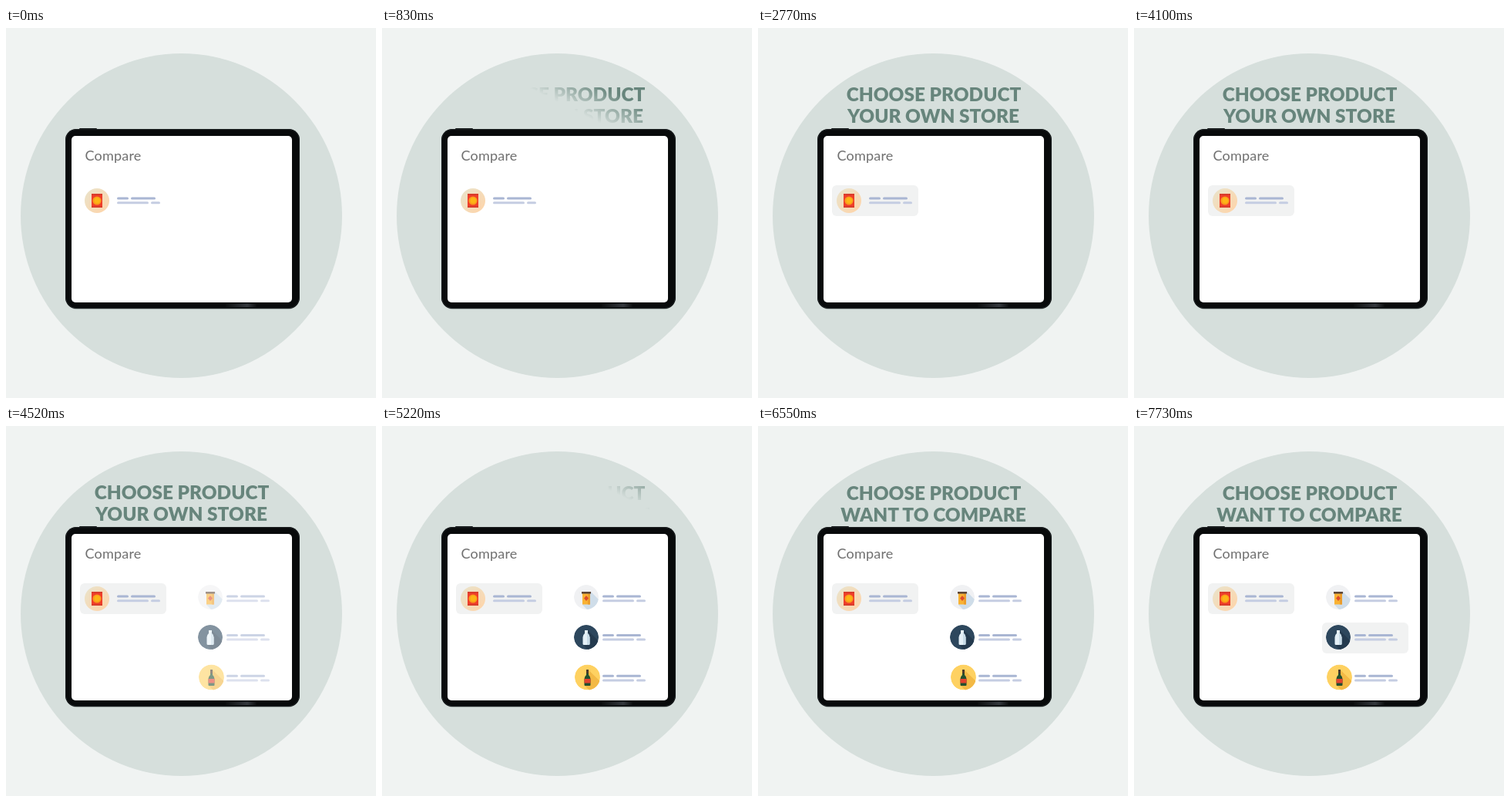
Write an HTML page that moves like this. It is 480 px wide and 480 px high and loops after 8 s.

```html
<!DOCTYPE html>
<html lang="en">
<head>
<meta charset="utf-8">
<title>Compare</title>
<style>
  html, body { margin: 0; height: 100%; overflow: hidden; background: #f0f3f2; }
  svg { display: block; width: 100%; height: 100%; }
  .headline { font: 900 24.4px Lato, sans-serif; text-anchor: middle; fill: url(#wipe); }
  .title { font: 18px Lato, sans-serif; letter-spacing: .2px; fill: #707070; }
  .card { fill: #f1f2f2; }
</style>
</head>
<body>
<svg viewBox="0 0 480 480">
  <defs>
    <!-- Soft diagonal edge, moved by gradientTransform -->
    <linearGradient id="wipe" gradientUnits="userSpaceOnUse" x1="0" y1="77" x2="20" y2="37">
      <stop offset="0" stop-color="#67857c" stop-opacity="0"/>
      <stop offset="1" stop-color="#67857c"/>
    </linearGradient>
    <linearGradient id="peach" x2="1" y2="1">
      <stop offset=".1" stop-color="#ebe2c8"/>
      <stop offset=".9" stop-color="#fdd5ab"/>
    </linearGradient>
    <linearGradient id="gloss">
      <stop offset="0" stop-color="#0b0d0e"/>
      <stop offset=".7" stop-color="#34383d"/>
      <stop offset="1" stop-color="#0b0d0e"/>
    </linearGradient>
    <clipPath id="disc"><circle r="16"/></clipPath>
    <g id="lines" stroke-width="3" stroke-linecap="round">
      <path d="M1.5 0h12M19.5 0h29" stroke="#a9b6d3"/>
      <path d="M1.5 5.7h38M45.5 5.7h9" stroke="#c5cde2"/>
    </g>
  </defs>

  <ellipse cx="227.5" cy="243.5" rx="208.5" ry="210.5" fill="#d6dfdc"/>

  <text class="headline"><tspan x="228" y="95">CHOOSE PRODUCT</tspan><tspan id="second" x="227.5" y="123"></tspan></text>

  <rect x="78" y="133" width="302" height="232" rx="14" fill="#9ba4a2"/>
  <rect x="95" y="130" width="23" height="3" rx="1" fill="#15191a"/>
  <rect x="77" y="131" width="304" height="233" rx="14" fill="#080a0b"/>
  <rect x="77.7" y="131.7" width="302.6" height="231.6" rx="13.3" fill="none" stroke="#1d2224"/>
  <rect x="285" y="357.5" width="40" height="4.5" fill="url(#gloss)"/>
  <rect x="85" y="140" width="286" height="216" rx="5" fill="#fff"/>
  <text class="title" x="102.5" y="172">Compare</text>

  <rect id="card1" class="card" x="96" y="204" width="112" height="40" rx="6"/>
  <rect id="card2" class="card" x="244" y="255" width="112" height="40" rx="6"/>

  <g transform="translate(118 224)">
    <circle r="16" fill="url(#peach)"/>
    <path d="M-7-9H7V9H-7z" fill="#ef3e2a"/>
    <path d="M-7-9H7v2H-7zM-7 7H7v2H-7z" fill="#d93b2b"/>
    <circle r="5.6" fill="#f99a1c"/>
    <circle cx=".3" cy="-.3" r="3.8" fill="#fdb515"/>
  </g>
  <use href="#lines" x="144" y="221"/>

  <g id="products">
    <g transform="translate(265 222)">
      <g clip-path="url(#disc)">
        <circle r="16" fill="#f0f1f3"/>
        <path d="M6-7L22 9V24H9L-5 10z" fill="#cfdde9"/>
      </g>
      <path d="M-5-5H5V9.5H-5z" fill="#f9b233"/>
      <path d="M2-5H5V9.5H2z" fill="#eb9d2c"/>
      <path d="M-6-7H6v2.6H-6z" fill="#5d4637"/>
      <path d="M0-2L3 1.5 0 5-3 1.5z" fill="#dd4a2b"/>
    </g>
    <use href="#lines" x="286" y="221"/>

    <g transform="translate(265 274)">
      <g clip-path="url(#disc)">
        <circle r="16" fill="#2d475d"/>
        <path d="M2-9L22 11V24H10L-4 10z" fill="#243a4e"/>
      </g>
      <path d="M-2-9H2V-5Q4.500-3 4.500 0V8.500Q4.500 10 3 10H-3Q-4.500 10-4.500 8.500V0Q-4.500-3-2-5z" fill="#e4f0f7"/>
      <path d="M1-6Q4.500-3 4.500 0V8.500Q4.500 10 3 10H1z" fill="#c8dce8"/>
    </g>
    <use href="#lines" x="286" y="271.400"/>

    <g transform="translate(266.500 326)">
      <g transform="scale(1.030)" clip-path="url(#disc)">
        <circle r="16" fill="#fed161"/>
        <path d="M1.500-9L22 11V26H12L-3 11z" fill="#f3b945"/>
      </g>
      <path d="M-1.500-10H1.500V-3Q4-1 4 2V10Q4 11 3 11H-3Q-4 11-4 10V2Q-4-1-1.500-3z" fill="#23502f"/>
      <path d="M-1.500-10H1.500V-5H-1.500z" fill="#4b3b2b"/>
      <path d="M-4 2H4V7.500H-4z" fill="#e2432e"/>
    </g>
    <use href="#lines" x="286" y="324.300"/>
  </g>
</svg>
<script>
  const LOOP = 8000, SWAP = 5010;
  const [wipe, second, products, card1, card2, headline] =
    ['#wipe', '#second', '#products', '#card1', '#card2', '.headline'].map(s => document.querySelector(s));

  const show = (el, on) => el.setAttribute('opacity', on ? 1 : 0);

  function draw(now) {
    const t = now % LOOP;
    const swapped = t >= SWAP;

    second.textContent = swapped ? 'WANT TO COMPARE' : 'YOUR OWN STORE';
    headline.setAttribute('transform', `translate(0 ${swapped ? 1 : 0})`);

    const edge = 341 - 0.271 * (t - (swapped ? SWAP : 270));
    wipe.setAttribute('gradientTransform', `translate(${edge / 5} ${-edge * 2 / 5})`);

    const fade = Math.min(1, Math.max(0, (t - 4250) / 760));
    products.setAttribute('opacity', 1 - (1 - fade) ** 2);

    show(card1, t >= 2765);
    show(card2, t >= 7585);
  }

  function tick() {
    draw(performance.now());
    requestAnimationFrame(tick);
  }
  tick();
</script>
</body>
</html>
```
